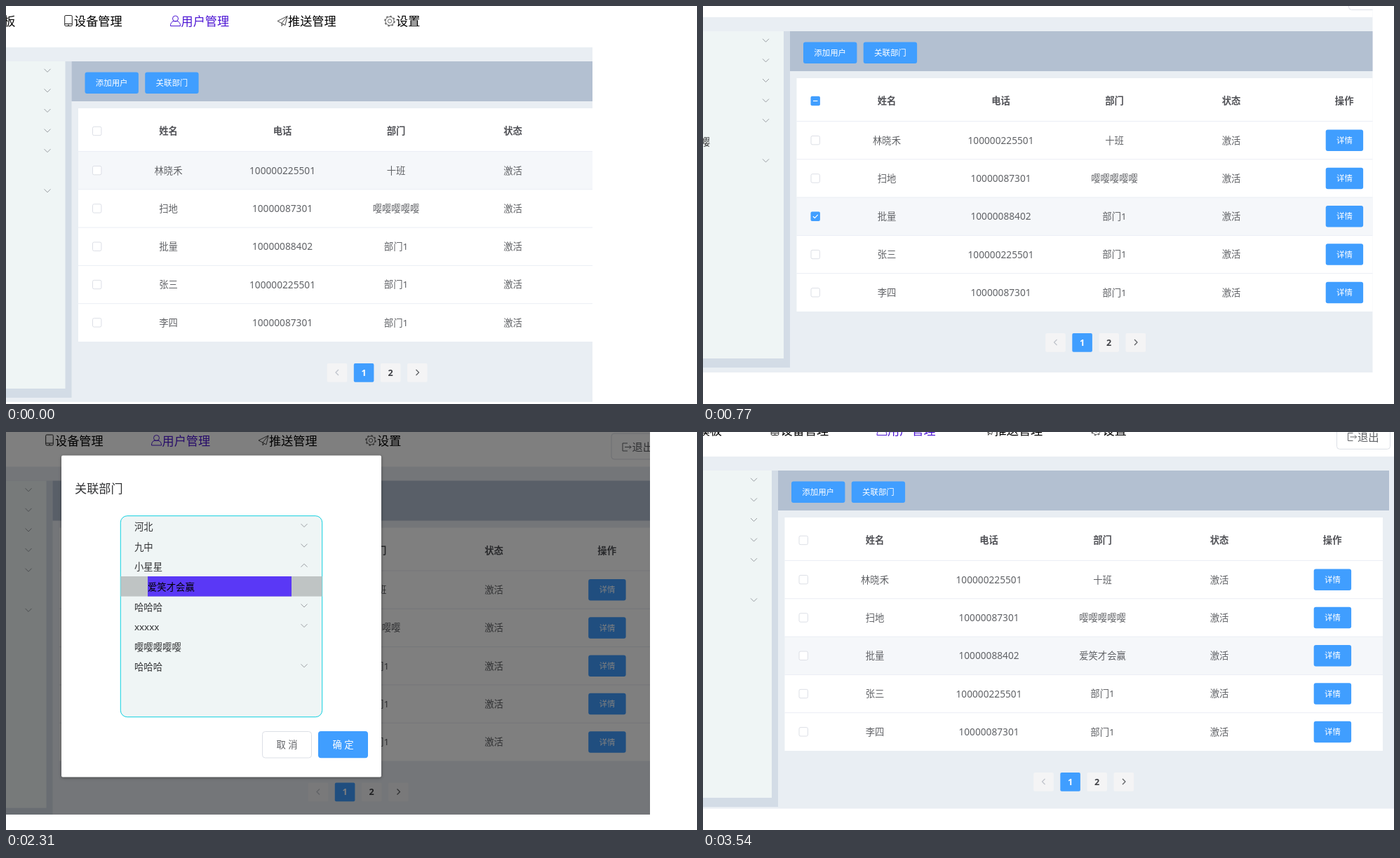
An HTML page for the animation above (3.85 s loop, 985 px wide and 568 px high).

```html
<!DOCTYPE html>
<html lang="zh-CN">
<head>
<meta charset="utf-8">
<style>
  html, body { margin: 0; width: 100%; height: 100%; overflow: hidden; background: #fff; }
  svg { display: block; font-family: "Noto Sans", "Noto Sans CJK SC", "Noto Sans CJK", sans-serif; }
  .dialog { filter: drop-shadow(0 1px 2px rgba(0, 0, 0, .4)); }
</style>
</head>
<body>
<svg id="stage" width="985" height="568" viewBox="0 0 985 568"></svg>
<script>
const HOLD = 770;
const BLUE = '#409eff', GREY = '#606266', LINE = '#dcdfe6', PALE = '#eff5f5';
const NAV_ACTIVE = '#4d16d4';
const ROW = 54.3, ITEM = 28.6;

// x, y: page offset; w, h: visible part of the stage
const views = [
  { x: 0, y: 0, w: 836, h: 565, hover: 0 },
  { x: 30.5, y: -43, w: 954.5, h: 523, hover: 2, checked: 2 },
  { x: -23, y: -1, w: 889.5, h: 568, dialog: true },
  { x: -27, y: -9.5, w: 918, h: 546, dialog: true, open: true },
  { x: 13.5, y: -24, w: 985, h: 537.5, hover: 2, moved: true },
];

const users = [
  ['林晓禾', '100000225501', '十班'],
  ['扫地', '10000087301', '嘤嘤嘤嘤嘤'],
  ['批量', '10000088402', '部门1'],
  ['张三', '100000225501', '部门1'],
  ['李四', '10000087301', '部门1'],
];
const departments = ['河北', '九中', '小星星', '哈哈哈', 'xxxxx', '嘤嘤嘤嘤嘤', '哈哈哈'];
const NO_CHILDREN = 5;

const rect = (x, y, w, h, fill, r = 0, stroke = 'none') =>
  `<rect x="${x}" y="${y}" width="${w}" height="${h}" rx="${r}" fill="${fill}" stroke="${stroke}"/>`;
const text = (s, x, y, fill = GREY, size = 13.35, anchor = 'middle', weight = 400) =>
  `<text x="${x}" y="${y}" dy=".37em" fill="${fill}" font-size="${size}" text-anchor="${anchor}" font-weight="${weight}">${s}</text>`;
const path = (d, stroke, width = 1) =>
  `<path d="${d}" fill="none" stroke="${stroke}" stroke-width="${width}" stroke-linejoin="round"/>`;
const button = (s, x, y, w) =>
  rect(x, y, w, 30.5, BLUE, 3) + text(s, x + w / 2, y + 15.2, '#fff', 11.45);
const chevron = (x, y, dir = 1) =>
  path(`M${x - 4.5} ${y - 2.2 * dir}l4.5 ${4.5 * dir} 4.5 ${-4.5 * dir}`, '#909399', .9);

function checkbox(y, mark) {
  if (!mark) return rect(123.5, y - 6.2, 12.4, 12.4, '#fff', 2, LINE);
  return rect(123, y - 6.7, 13.4, 13.4, BLUE, 2) + path(mark, '#fff', 1.2);
}

function header() {
  const items = [['设备管理', 97], ['用户管理', 249.5], ['推送管理', 402], ['设置', 556]];
  return rect(-40, -10, 1060, 69, '#fff')
    + text('模板', 13.5, 22, '#000', 17.15, 'end')
    + items.map(([s, x], i) => text(s, x, 22, i === 1 ? NAV_ACTIVE : '#000', 17.15, 'start')).join('')
    + rect(83.7, 13.5, 10.6, 15, 'none', 1.5, '#222') + path('M84 25.5h10M88 27.2h2', '#222')
    + `<circle cx="241.5" cy="18" r="4" fill="none" stroke="${NAV_ACTIVE}"/>`
    + path('M234.5 28.5q0-6 4.5-6.8h5q4.5 .8 4.5 6.8z', NAV_ACTIVE)
    + path('M387 21.5L401 14.5 398 27.5 393 24.5zM393 24.5L401 14.5M393 24.5v4l2.5-2.6', '#333', .9)
    + '<g fill="none" stroke="#666"><circle cx="547" cy="21.5" r="2.7"/><circle cx="547" cy="21.5" r="6"/>'
    + '<circle cx="547" cy="21.5" r="7" stroke-width="1.6" stroke-dasharray="2.75"/></g>'
    + rect(890, 11.7, 76, 36.7, '#fff', 4, LINE)
    + path('M913 25.5h-7v11h7M909 31h9M915.5 28.5l2.5 2.5-2.5 2.5', GREY)
    + text('退出', 919.5, 31, GREY, 15.3, 'start');
}

function sidebar() {
  return rect(-40, 79, 133.5, 480, '#d3dce6') + rect(-40, 79, 124.5, 467, PALE)
    + departments.map((_, i) => i === NO_CHILDREN ? '' : chevron(59, 92 + i * ITEM)).join('')
    + text(departments[NO_CHILDREN], -20.5, 237, '#303133', 13.35, 'end');
}

function table({ hover, checked, moved }) {
  const heads = [['姓名', 231.5], ['电话', 394], ['部门', 556], ['状态', 722.5], ['操作', 883.7]];
  const dash = checked === undefined ? '' : 'M126.5 178.5h6.4';
  const rows = users.map(([name, phone, dept], i) => {
    const top = 207.5 + i * ROW, y = top + ROW / 2;
    const tick = i === checked ? `M126.4 ${y}l2.4 2.4 4.4-4.8` : '';
    return rect(103, top, 852.5, ROW, i === hover ? '#f5f7fa' : '#fff')
      + rect(103, top - .5, 852.5, 1, '#ebeef5')
      + checkbox(y, tick)
      + text(name, 231.5, y)
      + text(phone, 394, y, GREY, 13.7)
      + text(moved && i === 2 ? '爱笑才会赢' : dept, 556, y)
      + text('激活', 722.5, y)
      + button('详情', 857.2, y - 15.2, 53.4);
  });
  return rect(103, 146, 852.5, 61.5, '#fff') + checkbox(178.5, dash)
    + heads.map(([s, x]) => text(s, x, 178.5, '#515257', 13.35, 'middle', 700)).join('')
    + rows.join('');
}

function pager() {
  return [0, 1, 2, 3].map(i => rect(457.7 + i * 38.1, 510, 28.6, 26.7, i === 1 ? BLUE : '#f4f4f5', 2)).join('')
    + path('M474 519l-4 4 4 4', '#c0c4cc', 1.3) + path('M584.5 519l4 4-4 4', GREY, 1.3)
    + text('1', 510, 523.3, '#fff', 12.6, 'middle', 700)
    + text('2', 548.2, 523.3, '#414247', 12.6, 'middle', 700);
}

function dialog(open) {
  const items = departments.map((name, i) => {
    const y = 144.8 + (i + (open && i > 2 ? 1 : 0)) * ITEM;
    return text(name, 210, y, '#303133', 13.35, 'start')
      + (i === NO_CHILDREN ? '' : chevron(452, y - 2, open && i === 2 ? -1 : 1));
  });
  const child = rect(190.5, 215.5, 287, 28.6, '#bfc4c4') + rect(229, 215.5, 205, 28.6, '#5a38f6')
    + text('爱笑才会赢', 229, 230.3, '#000', 13.35, 'start');
  return `<g class="dialog">${rect(106, 43, 456, 459, '#fff', 2)}</g>`
    + text('关联部门', 125, 90.3, '#303133', 17.15, 'start')
    + rect(190.3, 129.2, 287.4, 287, PALE, 9.5, '#10d0e0')
    + items.join('') + (open ? child : '')
    + rect(392.5, 437, 70, 37.5, '#fff', 4, LINE) + text('取 消', 427.5, 455.7)
    + rect(472, 436.5, 71, 38.2, BLUE, 4) + text('确 定', 507.5, 455.7, '#fff', 13.35, 'middle', 500);
}

function scene(v) {
  return `<clipPath id="window"><rect width="${v.w}" height="${v.h}"/></clipPath>
    <g clip-path="url(#window)">${rect(0, 0, 985, 568, '#e9eef3')}
    <g transform="translate(${v.x} ${v.y})">
      ${header()}${sidebar()}
      ${rect(93.5, 79, 871, 57, '#b3c0d1')}
      ${button('添加用户', 112.5, 94.5, 76.4)}${button('关联部门', 198.2, 94.5, 76.4)}
      ${table(v)}${pager()}
      ${v.dialog ? rect(-40, -10, 1100, 620, 'rgba(0,0,0,.5)') + dialog(v.open) : ''}
    </g></g>`;
}

const stage = document.getElementById('stage');
let shown = -1;
function tick() {
  const step = Math.floor(performance.now() / HOLD) % views.length;
  if (step !== shown) stage.innerHTML = scene(views[shown = step]);
  requestAnimationFrame(tick);
}
tick();
</script>
</body>
</html>
```
